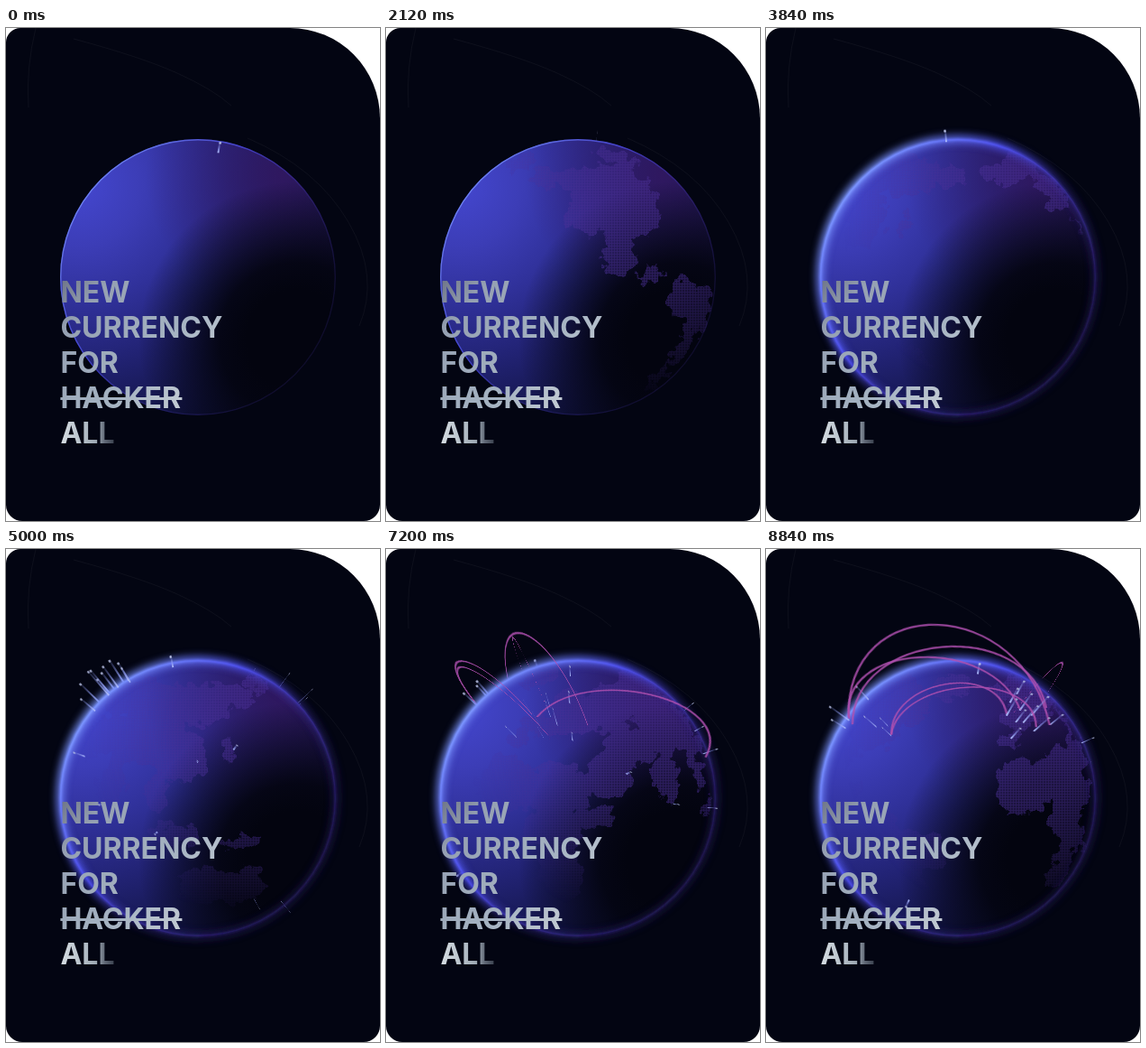
Recreate the animation shown at these times as an HTML page without scripts. Size 415 by 546 pixels, loop 8.88 s.

```html
<!DOCTYPE html>
<html lang="en">
<head>
<meta charset="utf-8">
<title>Globe</title>
<style>
:root { --loop: 8880ms; }
html, body { margin: 0; width: 100%; height: 100%; overflow: hidden; background: #fff; }
.stage {
  position: absolute; inset: 0; overflow: hidden; isolation: isolate;
  background: #030512; border-radius: 16px 100px 18px 18px;
}
.full { position: absolute; left: 0; top: 0; width: 415px; height: 546px; }
.scene, .tilt, .orbit { transform-style: preserve-3d; }
.scene { position: absolute; left: 60px; top: 123px; width: 306px; height: 306px; }
.tilt, .orbit { position: absolute; inset: 0; }
.orbit { animation: spin var(--loop) linear infinite; }
@keyframes spin {
  from { transform: rotateX(-16deg) rotateY(36deg); }
  to { transform: rotateX(-16deg) rotateY(396deg); }
}

/* Sphere body: an opaque disc that hides whatever passes behind it */
.globe { position: absolute; inset: 0; transform: translateZ(0); }
.ball {
  position: absolute; inset: 0; border-radius: 50%;
  background:
    radial-gradient(circle at 262px 222px, #03040f 0 55px, #03040fea 85px, #03040f00 175px),
    radial-gradient(circle at 245px 40px, #32175fdd, #32175f00 150px),
    radial-gradient(circle at 20px 50px, #4447d0, #3c3db6 70px, #30319a 130px, #212272 200px, #111341 280px, #070820 340px);
}
.rim { position: absolute; left: -30px; top: -30px; width: 366px; height: 366px; fill: none; }
.glow { animation: glow var(--loop) linear infinite; }
@keyframes glow { 0%, 28% { opacity: 0; } 40%, 100% { opacity: 1; } }

/* Land: round patches on the sphere, merged into coasts by a filter */
.land {
  position: absolute; inset: 0; clip-path: circle(50%); filter: url(#coast);
  --dots: radial-gradient(#000 .9px, #0008 1.5px);
  --light: radial-gradient(circle at 225px 90px, #000b 70px, #0007 130px, #0000 200px);
  -webkit-mask-image: var(--dots), var(--light); mask-image: var(--dots), var(--light);
  -webkit-mask-size: 3px 3px, auto; mask-size: 3px 3px, auto;
  -webkit-mask-composite: source-in; mask-composite: intersect;
  animation: rise var(--loop) linear infinite;
}
@keyframes rise { 0%, 2% { opacity: 0; } 16%, 100% { opacity: .75; } }
.land i {
  position: absolute; left: 50%; top: 50%; border-radius: 45%; background: #4d3099;
  width: calc(var(--w) * 1px); height: calc(var(--h) * 1px);
  margin: calc(var(--h) * -.5px) 0 0 calc(var(--w) * -.5px);
  backface-visibility: hidden;
  transform: rotateY(calc(var(--o) * 1deg)) rotateX(calc(var(--a) * 1deg)) translateZ(147px);
}

/* Pins stand on the surface; arcs lie in planes through the centre */
.pins i {
  position: absolute; left: 50%; bottom: 50%; width: 2px; margin-left: -1px;
  height: calc(var(--h, 22) * 1px); transform-origin: 50% 100%;
  transform: rotateY(calc(var(--o) * 1deg)) rotateX(calc(var(--a) * 1deg)) rotateZ(45deg) rotateX(-90deg) translateY(-151px);
}
.pins i::before, .pins i::after { content: ""; position: absolute; left: 0; }
.pins i::before {
  inset: 0; background: linear-gradient(#8f9cf022, #8f9cf0bb 60%, #b4c2ff);
  transform-origin: 50% 100%; animation: grow var(--loop) ease-out infinite;
}
.pins i::after {
  top: -2px; left: -.5px; width: 3px; height: 3px; border-radius: 50%;
  background: #b9c1e6; animation: show var(--loop) linear infinite;
}
.pins .north::before, .pins .north::after { animation: none; }
@keyframes grow { 0%, 48% { transform: scaleY(0); } 56%, 100% { transform: none; } }
@keyframes show { 0%, 51% { opacity: 0; } 56%, 100% { opacity: .9; } }
.arcs svg {
  position: absolute; left: 50%; top: 50%; width: 520px; height: 520px; margin: -260px;
  fill: none; stroke: #b04fb0; stroke-width: 2.3; stroke-opacity: .85; overflow: visible;
  transform: rotateY(calc(var(--o) * 1deg)) rotateX(calc(var(--a) * 1deg)) rotateZ(calc(var(--z) * 1deg)) rotateX(-90deg);
}
.arcs path { stroke-dasharray: 1 4; animation: draw var(--loop) linear infinite; }
.arcs .late path { animation-name: late; }
@keyframes draw { 0%, 70% { stroke-dashoffset: var(--d, 1.02); } 80%, 100% { stroke-dashoffset: 0; } }
@keyframes late { 0%, 82% { stroke-dashoffset: 1.02; } 90%, 100% { stroke-dashoffset: 0; } }
text { font: 700 32px Inter, "Liberation Sans", sans-serif; }
</style>
</head>
<body>
<div class="stage">
  <svg class="full" viewBox="0 0 415 546" fill="none" stroke="#fff" stroke-opacity=".045">
    <path d="M33 0Q22 45 25 88M75 12Q150 32 190 50T250 86M268 122Q345 155 380 215T392 330"/>
  </svg>

  <div class="scene">
    <div class="globe">
      <div class="ball"></div>
      <div class="land"><div class="tilt"><div class="orbit">
        <i style="--o:-100;--a:60;--w:90;--h:52"></i>
        <i style="--o:-145;--a:64;--w:60;--h:30"></i>
        <i style="--o:-74;--a:54;--w:46;--h:50"></i>
        <i style="--o:-110;--a:44;--w:74;--h:50"></i>
        <i style="--o:-88;--a:41;--w:68;--h:50"></i>
        <i style="--o:-102;--a:25;--w:40;--h:46"></i>
        <i style="--o:-88;--a:14;--w:30;--h:18"></i>
        <i style="--o:-42;--a:73;--w:42;--h:52"></i>
        <i style="--o:-70;--a:1;--w:46;--h:42"></i>
        <i style="--o:-53;--a:-8;--w:74;--h:50"></i>
        <i style="--o:-61;--a:-22;--w:50;--h:50"></i>
        <i style="--o:-68;--a:-41;--w:24;--h:64"></i>
        <i style="--o:-3;--a:19;--w:74;--h:62"></i>
        <i style="--o:22;--a:20;--w:76;--h:58"></i>
        <i style="--o:40;--a:8;--w:38;--h:26"></i>
        <i style="--o:21;--a:2;--w:64;--h:46"></i>
        <i style="--o:24;--a:-18;--w:50;--h:80"></i>
        <i style="--o:-4;--a:40;--w:26;--h:22"></i>
        <i style="--o:14;--a:49;--w:60;--h:30"></i>
        <i style="--o:17;--a:64;--w:24;--h:40"></i>
        <i style="--o:44;--a:56;--w:86;--h:56"></i>
        <i style="--o:76;--a:60;--w:90;--h:60"></i>
        <i style="--o:115;--a:61;--w:90;--h:62"></i>
        <i style="--o:150;--a:65;--w:70;--h:36"></i>
        <i style="--o:47;--a:25;--w:48;--h:50"></i>
        <i style="--o:62;--a:37;--w:66;--h:44"></i>
        <i style="--o:78;--a:19;--w:38;--h:56"></i>
        <i style="--o:90;--a:41;--w:82;--h:62"></i>
        <i style="--o:112;--a:34;--w:66;--h:60"></i>
        <i style="--o:102;--a:17;--w:28;--h:42"></i>
        <i style="--o:138;--a:37;--w:15;--h:32"></i>
        <i style="--o:110;--a:0;--w:54;--h:24"></i>
        <i style="--o:140;--a:-5;--w:38;--h:18"></i>
        <i style="--o:124;--a:-25;--w:56;--h:50"></i>
        <i style="--o:143;--a:-26;--w:50;--h:54"></i>
      </div></div></div>
      <svg class="rim" viewBox="-183 -183 366 366">
        <defs>
          <linearGradient id="edge" x1=".05" y1=".2" x2=".9" y2=".85">
            <stop offset="0" stop-color="#7f9bff"/>
            <stop offset=".35" stop-color="#4c4ee8"/>
            <stop offset=".62" stop-color="#3a2f9c" stop-opacity=".5"/>
            <stop offset="1" stop-color="#2a2168" stop-opacity=".4"/>
          </linearGradient>
          <filter id="soft" x="-20%" y="-20%" width="140%" height="140%"><feGaussianBlur stdDeviation="4"/></filter>
          <filter id="fine"><feGaussianBlur stdDeviation="1.1"/></filter>
          <filter id="coast" x="0" y="0" width="100%" height="100%">
            <feGaussianBlur stdDeviation="3"/>
            <feColorMatrix values="1 0 0 0 0  0 1 0 0 0  0 0 1 0 0  0 0 0 9 -4" result="mass"/>
            <feTurbulence type="fractalNoise" baseFrequency=".07" numOctaves="3" seed="4"/>
            <feDisplacementMap in="mass" scale="24" xChannelSelector="R" yChannelSelector="G"/>
          </filter>
        </defs>
        <g stroke="url(#edge)">
          <circle r="152.3" stroke-width="1.4" opacity=".75"/>
          <g class="glow">
            <circle r="153" stroke-width="8" filter="url(#soft)"/>
            <circle r="152.5" stroke-width="3" filter="url(#fine)"/>
          </g>
        </g>
      </svg>
    </div>

    <div class="orbit pins">
      <i class="north" style="--o:15;--a:79;--h:12"></i>
      <i style="--o:0;--a:51;--h:30"></i>
      <i style="--o:4;--a:47;--h:24"></i>
      <i style="--o:9;--a:46;--h:33"></i>
      <i style="--o:13;--a:52;--h:28"></i>
      <i style="--o:10;--a:57"></i>
      <i style="--o:-4;--a:40;--h:26"></i>
      <i style="--o:13;--a:41;--h:30"></i>
      <i style="--o:19;--a:48;--h:34"></i>
      <i style="--o:25;--a:60;--h:18"></i>
      <i style="--o:29;--a:41;--h:20"></i>
      <i style="--o:55;--a:25;--h:14"></i>
      <i style="--o:77;--a:9;--h:8"></i>
      <i style="--o:114;--a:22;--h:16"></i>
      <i style="--o:121;--a:31;--h:10"></i>
      <i style="--o:140;--a:36;--h:14"></i>
      <i style="--o:104;--a:1;--h:10"></i>
      <i style="--o:151;--a:-34;--h:14"></i>
      <i style="--o:175;--a:-41;--h:16"></i>
      <i style="--o:-60;--a:-34;--h:10"></i>
      <i style="--o:-74;--a:40;--h:20"></i>
      <i style="--o:-80;--a:44;--h:16"></i>
      <i style="--o:-88;--a:42"></i>
      <i style="--o:-122;--a:37;--h:26"></i>
      <i style="--o:-118;--a:34;--h:18"></i>
      <i style="--o:-123;--a:49;--h:20"></i>
    </div>

    <div class="orbit arcs">
      <svg viewBox="-260 -260 520 520" style="--o:-41;--a:52;--z:-15"><path pathLength="1" d="M-65-139C-60-239 60-239 65-139"/></svg>
      <svg viewBox="-260 -260 520 520" style="--o:-30;--a:51;--z:-2;--d:1.1"><path pathLength="1" d="M-81-130C-74-242 74-242 81-130"/></svg>
      <svg viewBox="-260 -260 520 520" style="--o:-71;--a:68;--z:-21;--d:1.2"><path pathLength="1" d="M-100-115C-90-219 90-219 100-115"/></svg>
      <svg viewBox="-260 -260 520 520" style="--o:-52;--a:73;--z:-18;--d:1.3"><path pathLength="1" d="M-108-108C-96-229 96-229 108-108"/></svg>
      <svg viewBox="-260 -260 520 520" style="--o:74;--a:50;--z:29"><path pathLength="1" d="M-104-112C-95-215 95-215 104-112"/></svg>
      <svg class="late" viewBox="-260 -260 520 520" style="--o:-54;--a:73;--z:-6"><path pathLength="1" d="M-115-101C-100-270 100-270 115-101"/></svg>
    </div>
  </div>

  <svg class="full" viewBox="0 0 415 546">
    <defs>
      <linearGradient id="steel" gradientUnits="userSpaceOnUse" x1="61" y1="280" x2="225" y2="425">
        <stop offset="0" stop-color="#6f7688"/>
        <stop offset=".18" stop-color="#95a0b2"/>
        <stop offset=".6" stop-color="#a5b3c2"/>
        <stop offset="1" stop-color="#d0d5dc"/>
      </linearGradient>
      <linearGradient id="fade" gradientUnits="userSpaceOnUse" x1="61" y1="0" x2="120" y2="0">
        <stop offset="0" stop-color="#d6dde2"/>
        <stop offset=".45" stop-color="#b3bdc6"/>
        <stop offset=".7" stop-color="#98a3ae"/>
        <stop offset=".82" stop-color="#626a78"/>
        <stop offset="1" stop-color="#3b424f"/>
      </linearGradient>
    </defs>
    <g fill="url(#steel)">
      <text x="60.4" y="304">NEW</text>
      <text x="60.4" y="343">CURRENCY</text>
      <text x="60.4" y="382">FOR</text>
      <text x="60.4" y="421">HACKER</text>
      <rect x="60.4" y="409" width="135" height="3"/>
    </g>
    <text x="60.4" y="460" fill="url(#fade)">ALL</text>
  </svg>
</div>
</body>
</html>
```
